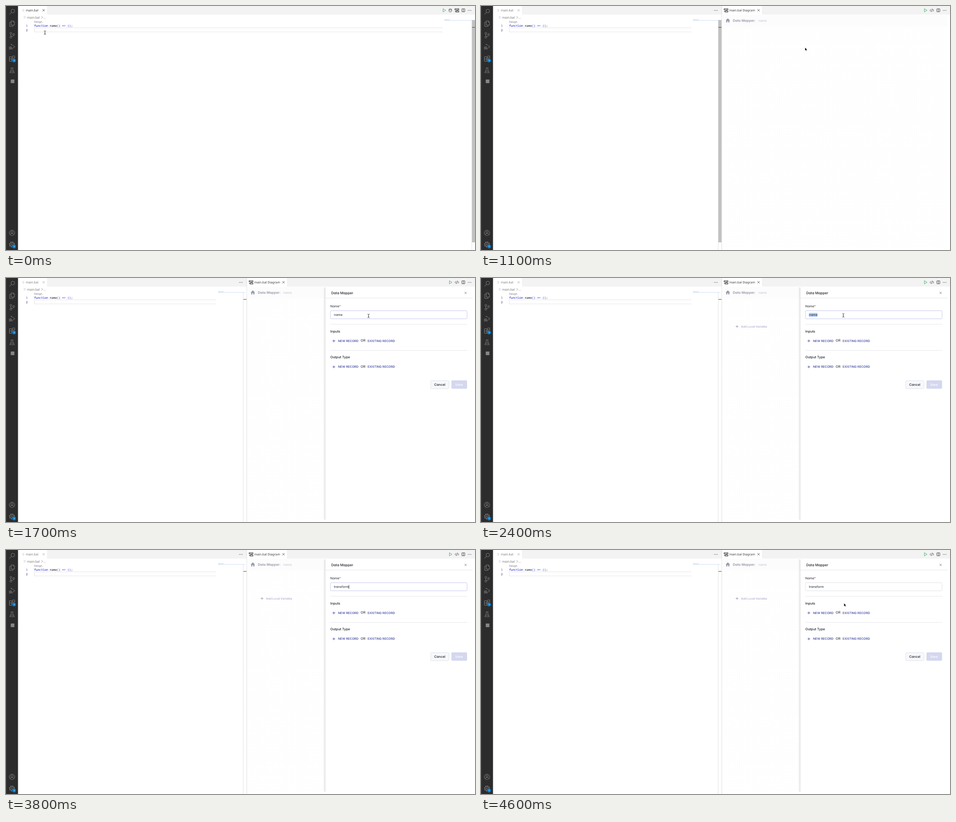
Write an HTML page that moves like this. It is 1035 by 541 pixels and loops after 4800 ms.

```html
<!DOCTYPE html>
<html lang="en">
<head>
<meta charset="utf-8">
<title>Data mapper form</title>
<style>
  html, body { margin: 0; width: 100%; height: 100%; overflow: hidden; background: #fff; }
  svg { display: block; width: 100%; height: 100%; }
  text { text-rendering: geometricPrecision; white-space: pre; }
  .ui { font-family: "Noto Sans", "Open Sans", sans-serif; font-size: 6.78px; fill: #333; }
  .crumb { fill: #6e6e6e; }
  .code { font-family: "Noto Sans Mono", "DejaVu Sans Mono", monospace; font-size: 6.46px; font-weight: 500; }
  .form { font-family: Inter, "Open Sans", sans-serif; font-size: 7.1px; font-feature-settings: "cv11"; fill: #1d2028; }
  .form .medium { font-weight: 500; }
  .form .heading { font-size: 7.35px; font-weight: 500; }
  .form .link { font-size: 6.7px; font-weight: 500; fill: #36409f; }
  .line { fill: none; stroke: #3c3c3c; stroke-width: .9; }
  .bar { fill: none; stroke: #858585; stroke-width: .9; }
  .rule { stroke: #e6e7ec; stroke-width: 1; }
  .badge { fill: #007acc; }
  .badge-text { font: 600 5px Inter, sans-serif; fill: #fff; text-anchor: middle; }
</style>
</head>
<body>
<svg viewBox="0 0 1035 541" preserveAspectRatio="none">
  <defs>
    <path id="close" d="M-2.3-2.3 2.3 2.3M2.3-2.3-2.3 2.3"/>
    <path id="plus" d="M-3 0H3M0-3V3" stroke-width=".9"/>
    <path id="beam" d="M-2.3-4Q0-4 0-2.8Q0-4 2.3-4M0-3V3M-2.3 4Q0 4 0 2.8Q0 4 2.3 4M-1 1h2"/>
    <g id="dots"><circle cx="-3" r=".75"/><circle r=".75"/><circle cx="3" r=".75"/></g>
    <path id="play" d="M-2.5-3.5 3.3 0-2.5 3.5Z" fill="none" stroke="#4fb477"/>
    <path id="file" d="M-1.6-2h1.1M.5-2h1.3M-1.6 0h1.1M.5 0h1.3M-1.6 2h1.1M.5 2h1.3" stroke="#a6a6a6" stroke-width=".8"/>
    <g id="flow" fill="none" stroke="#222" stroke-width="1">
      <rect x="-4.2" y="-3.5" width="8.4" height="2.6"/><rect x="-2" y="1.3" width="6.2" height="2.6"/><path d="M-4.4 2.6h2.4M.9-.9v2.2"/>
    </g>
    <g id="split" class="line"><rect x="-3.3" y="-3.3" width="6.6" height="6.6" rx=".5"/><path d="M0-3.3V3.3"/></g>
    <pattern id="grid" width="4.65" height="4.65" patternUnits="userSpaceOnUse" x="531" y="46">
      <circle cx="2.3" cy="2.3" r=".5" fill="#e9eaee"/>
    </pattern>
    <linearGradient id="shade"><stop stop-color="#777" stop-opacity="0"/><stop offset="1" stop-color="#777" stop-opacity=".22"/></linearGradient>
    <clipPath id="view"><rect x="531" y="19" width="499" height="517"/></clipPath>
  </defs>

  <rect width="1035" height="541" fill="#fff"/>
  <rect x="26" width="1009" height="19" fill="#f3f3f3"/>
  <rect x="27" width="63.5" height="19" fill="#fff"/>

  <!-- activity bar -->
  <rect width="26.5" height="541" fill="#2c2c2c"/>
  <path d="M1.2 0V541" stroke="#414141" stroke-width=".7"/>
  <g class="bar">
    <circle cx="15" cy="11.2" r="4"/><path d="M12 14 7.7 18.8"/>
    <path d="M11.5 33h4.7l2.5 2.5v6.8h-7.2zM16 33v2.7h2.7M11.3 36H8.2v9.3h7.2v-2.8"/>
    <circle cx="10.6" cy="60.5" r="2"/><circle cx="10.6" cy="69.3" r="2"/><circle cx="16.8" cy="63" r="2"/><path d="M10.6 62.5v4.8M16.8 65c0 2-2 2.3-6.2 2.3"/>
    <path d="M11.3 87V84.4l8.4 6-6 4.2"/><circle cx="10.3" cy="93" r="2.6"/><path d="M10.3 90.5v5M6.6 90.5l1.6 1M6.5 93.3h1.2M6.6 96.3l1.6-1M14 96.3l-1.6-1"/>
    <path d="M7.5 112.5h5.2v10h-5.2zM7.5 117.5h10.2v5h-5M14.5 110.8h4.7v4.7h-4.7z"/>
    <path d="M10.8 137.3h5.2M11.7 137.3v4l-3.5 6.5h10.4l-3.5-6.5v-4M10 144.3h6.8"/>
    <circle cx="13.3" cy="503" r="6"/><circle cx="13.3" cy="501.3" r="2.4"/><path d="M9.2 507.2c.7-4 7.5-4 8.2 0"/>
    <circle cx="13.2" cy="528.7" r="2"/><circle cx="13.2" cy="528.7" r="4.5"/><circle cx="13.2" cy="528.7" r="5.5" stroke-width="1.7" stroke-dasharray="2.1 2.22"/>
  </g>
  <rect x="10.5" y="163" width="8" height="8" fill="#858585"/>
  <circle class="badge" cx="17.8" cy="120.9" r="4.2"/><text class="badge-text" x="17.8" y="122.7">1</text>
  <circle class="badge" cx="17.8" cy="533.2" r="4.2"/><text class="badge-text" x="17.8" y="535">1</text>

  <!-- editor -->
  <use href="#file" x="38" y="9.5"/>
  <text id="tabName" class="ui" x="43.7" y="11.9">main.bal</text>
  <use id="tabClose" href="#close" class="line" x="83" y="9.5"/>
  <use href="#file" x="41" y="25"/>
  <g class="ui crumb">
    <text x="46.8" y="27.5">main.bal</text>
    <path d="M78.5 22.8 80.8 25.2 78.5 27.6" fill="none" stroke="#777" stroke-width=".8"/>
    <text x="82.8" y="27.5">...</text>
    <text x="62" y="36.8" font-size="5.5" style="font-size:5.5px">Design</text>
  </g>
  <g class="code">
    <text x="44" y="46" fill="#3a4a86">1</text><text x="44" y="55.6" fill="#0b216f">2</text>
    <text x="62" y="46"><tspan fill="#0000c8">function</tspan> name<tspan fill="#0420d0">()</tspan> <tspan fill="#0000c8">=&gt;</tspan> <tspan fill="#0420d0">()</tspan>;</text>
  </g>
  <rect id="currentLine" x="62.5" y="48.5" height="9" fill="none" stroke="#e6e6e6"/>
  <rect id="lineMask" y="48" width="3" height="10" fill="#fff"/>
  <g id="minimap">
    <path d="M0 30.6h12" stroke="#a5aec8" stroke-width=".8" stroke-dasharray="4 .6 3 .7 1 .6"/>
    <path d="M0 32h60" stroke="#bcd9f3" stroke-width=".8"/>
  </g>
  <rect id="scrollbar" y="31" height="493" fill="#c1c1c1"/>
  <path id="scrollEdge" d="M0 31V541" stroke="#dedede" stroke-width=".8"/>
  <path id="lineMark" d="M0 47.4h7" stroke="#424242"/>

  <g id="wideActions">
    <use href="#play" x="967" y="9.5"/>
    <g class="line" transform="translate(980.5 9.5)"><ellipse cy="-2" rx="2.8" ry="1.3"/><path d="M-2.8-2V2.2C-2.8 4 2.8 4 2.8 2.2V-2"/></g>
    <use href="#flow" x="995" y="9.5"/>
  </g>

  <!-- diagram column -->
  <g id="column">
    <use href="#dots" x="518.3" y="9.8" fill="#444"/>
    <rect x="531.3" y="19" width="504" height="522" fill="#fff"/>
    <rect x="531.3" width="88.7" height="19" fill="#fff"/>
    <path d="M531.2 0V541" stroke="#dedede"/>
    <use href="#flow" x="540.7" y="9.5"/>
    <text class="ui" x="548" y="11.9">main.bal Diagram</text>
    <use href="#close" class="line" x="612.5" y="9.5"/>
    <use href="#play" x="981" y="9.5"/>
    <path class="line" d="M993 7l-2.3 2.5L993 12M997 7l2.3 2.5L997 12M996 6l-2 7"/>

    <g id="loader">
      <rect x="543" y="19" width="475" height="199.5" fill="#f7f8fb"/>
      <circle cx="781" cy="210" r="8.2" fill="none" stroke="#e4e6ef"/>
      <path id="arc" d="M786.8 204.2A8.2 8.2 0 0 1 785.3 217" fill="none" stroke="#5567d5" stroke-width="1.9"/>
    </g>

    <g id="mapper" class="form" clip-path="url(#view)">
      <rect x="531.7" y="20" width="499" height="25.5" fill="#fcfcfd"/>
      <rect x="531.7" y="45.5" width="499" height="490" fill="url(#grid)"/>
      <path d="M539.8 32.2 544.7 27.6 549.6 32.2H548.2V36.4H545.8V33.2H543.6V36.4H541.2V32.2Z" fill="#9599a5"/>
      <text x="555.7" y="35" style="font-size:7.5px;font-weight:600;fill:#9599a5">Data Mapper:</text>
      <text x="611.7" y="34.8" style="fill:#c3c5cd">name</text>
      <g id="addLocal" style="fill:#a9abc9">
        <use href="#plus" x="565" y="107.5" stroke="#8e90a8"/>
        <text x="573.8" y="110" style="font-size:6.35px;font-weight:500">Add Local Variable</text>
      </g>

      <g id="panel">
        <rect x="700" y="21" width="5" height="515" fill="url(#shade)"/>
        <rect x="705" y="20" width="326" height="517" fill="#fff"/>
        <path class="rule" d="M705 44.5H1030"/>
        <text class="medium" x="717.8" y="35.6" style="font-size:7.7px">Data Mapper</text>
        <use href="#close" class="line" x="1014.3" y="33" style="stroke:#777"/>
        <text x="715.8" y="65.2" style="font-size:6.9px">Name<tspan fill="#d0302f">*</tspan></text>
        <rect id="field" x="716" y="72.5" width="301.5" height="18" rx="2" fill="#fff" stroke-width=".8"/>
        <rect id="selection" x="723.7" y="77.3" height="8.8" fill="#b1d1f8"/>
        <text id="value" x="723.7" y="84.1"></text>
        <path id="caret" d="M0 77.5V86" stroke="#111" stroke-width=".8"/>
        <g id="progress">
          <rect x="716" y="91" width="302" height="2.3" fill="#bbc1e9"/>
          <rect id="progressBar" y="91" height="2.3" fill="#5567d5"/>
        </g>
        <g id="fields">
          <path class="rule" d="M716 102.5H1018M716 160.5H1018"/>
          <text class="heading" x="715.8" y="120.8">Inputs</text>
          <text class="heading" x="715.8" y="178.4">Output Type</text>
          <g id="recordLinks">
            <use href="#plus" x="723.5" y="139.5" stroke="#36409f"/>
            <text class="link" x="732.8" y="141.9">NEW RECORD</text>
            <text x="782.8" y="141.2" style="font-size:7.4px">OR</text>
            <text class="link" x="798" y="141.9">EXISTING RECORD</text>
          </g>
          <use href="#recordLinks" y="57.5"/>
          <rect x="937" y="227.5" width="40.5" height="18" rx="2" fill="#f7f8fb" stroke="#e2e4ea"/>
          <text class="medium" x="957.3" y="238.9" text-anchor="middle" style="font-size:7.3px">Cancel</text>
          <rect x="983" y="227" width="34.5" height="18.6" rx="2" fill="#d4d7ef"/>
          <text class="medium" x="999.6" y="238.9" text-anchor="middle" style="fill:#fff">Save</text>
        </g>
      </g>
    </g>
  </g>
  <use href="#split" x="1009.3" y="9.5"/>
  <use href="#dots" x="1023" y="9.8" fill="#444"/>

  <g id="pointer">
    <g id="ibeam" fill="none">
      <use href="#beam" stroke="#fff" stroke-width="1.6"/>
      <use href="#beam" stroke="#222" stroke-width=".8"/>
    </g>
    <path id="arrow" d="M0 0V7L1.6 5.6 2.8 8 4 7.4 2.9 5.1H5Z" fill="#000" stroke="#fff" stroke-width=".5"/>
  </g>
</svg>
<script>
const LOOP = 4800, STEP = 100;
const $ = id => document.getElementById(id);
const set = (id, attrs) => Object.entries(attrs).forEach(([k, v]) => $(id).setAttribute(k, v));
const show = (id, on) => $(id).style.display = on ? "" : "none";

// time, x, y of the mouse
const path = [
  [0, 86, 59], [200, 73, 36], [500, 73, 36], [800, 425, 64], [1100, 715, 92],
  [1300, 756, 96], [1400, 760, 96], [1600, 798, 85], [1700, 800, 84],
  [2400, 799.6, 83], [4000, 799.6, 83], [4300, 801, 118], [4800, 801, 118]
];
const slide = [[1200, 240], [1300, 72.7], [1400, 10], [1500, 0]];
const keyTimes = [2500, 2600, 2800, 3000, 3100, 3200, 3300, 3500, 3600];

function sample(keys, t) {
  if (t <= keys[0][0]) return keys[0].slice(1);
  const i = keys.findIndex(k => k[0] >= t);
  if (i < 0) return keys[keys.length - 1].slice(1);
  const a = keys[i - 1], b = keys[i], p = (t - a[0]) / (b[0] - a[0]);
  return a.slice(1).map((v, n) => v + (b[n + 1] - v) * p);
}

function drawEditor(t, open) {
  const right = open ? 464 : 964, bar = open ? 523.5 : 1028;
  $("tabName").style.fill = open ? "#777" : "#333";
  $("tabClose").style.stroke = open ? "#aaa" : "#3c3c3c";
  set("currentLine", { width: right - 61 });
  set("lineMask", { x: right });
  set("minimap", { transform: `translate(${open ? 468 : 967.5})` });
  set("scrollbar", { x: bar, width: open ? 7.5 : 7, opacity: t < 1200 ? 1 : Math.max(0, 1 - (t - 1100) / 280) });
  set("scrollEdge", { transform: `translate(${bar})` });
  set("lineMark", { transform: `translate(${bar + .5})` });
  show("wideActions", !open);
  show("column", open);
}

function drawForm(t) {
  const typed = keyTimes.filter(k => k <= t).length;
  const focused = t >= 1600 && t < 4300;
  const busy = t < 1600 || (t >= 4400 && t < 4600);
  $("value").textContent = typed ? "transform".slice(0, typed) : "name";
  const width = $("value").getComputedTextLength();
  set("panel", { transform: `translate(${sample(slide, t)[0]})` });
  set("field", { stroke: focused ? "#b9bce6" : "#d9dbe2" });
  set("selection", { width });
  show("selection", t >= 2200 && !typed);
  set("caret", { transform: `translate(${723.9 + width})` });
  show("caret", typed && focused);
  const phase = t < 1600 ? (t - 1200) / 100 : (t - 4400) / 100;
  set("progressBar", { x: 716, width: Math.max(0, Math.min(302, 148 * phase)) });
  show("progress", busy);
  set("fields", { transform: `translate(0 ${busy ? 2.2 : 0})` });
}

function drawPointer(t) {
  const [x, y] = sample(path, t);
  const arrow = (t >= 200 && t <= 500) || (t >= 900 && t < 1600) || t >= 4200;
  set("pointer", { transform: `translate(${x} ${y})` });
  show("pointer", t < 2500 || t >= 4000);
  show("arrow", arrow);
  show("ibeam", !arrow);
}

function frame(now) {
  const t = Math.floor(now % LOOP / STEP) * STEP;
  drawEditor(t, t >= 500);
  show("loader", t >= 700 && t < 1100);
  set("arc", { transform: `rotate(${(t - 800) * .4} 781 210)` });
  show("mapper", t >= 1100);
  show("panel", t >= 1200);
  show("addLocal", t >= 2000);
  drawForm(t);
  drawPointer(t);
}

const start = performance.now();
function tick() {
  frame(performance.now() - start);
  requestAnimationFrame(tick);
}
tick();
</script>
</body>
</html>
```
